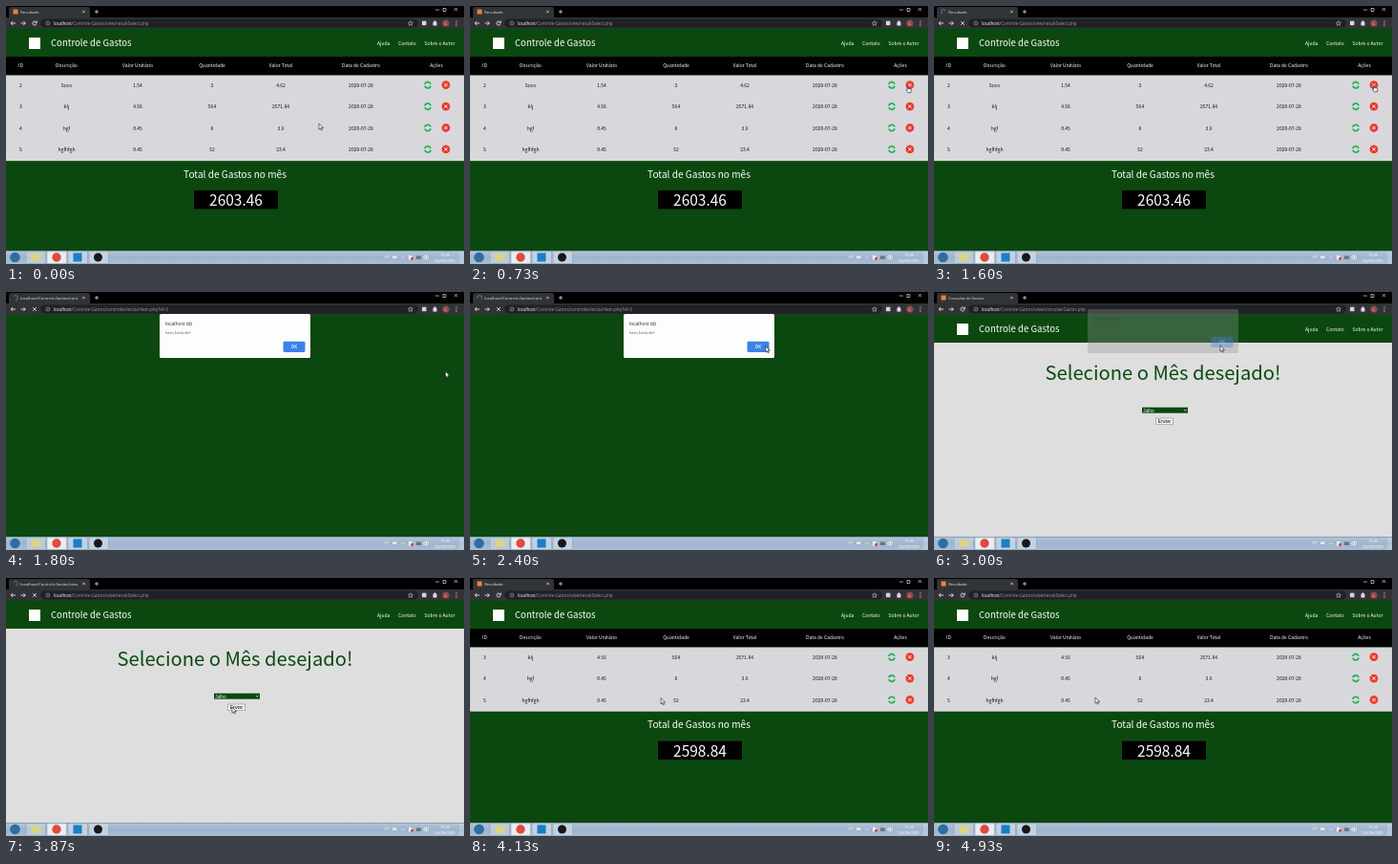
An HTML page with a canvas that plays this animation: 480x270 px, repeating every 4990 ms.

```html
<!DOCTYPE html>
<html lang="pt">
<head>
<meta charset="utf-8">
<style>
html, body { margin: 0; width: 100%; height: 100%; overflow: hidden; background: #000; }
canvas { display: block; width: 480px; height: 270px; }
</style>
</head>
<body>
<canvas id="stage" width="480" height="270"></canvas>
<script>
const g = document.getElementById('stage').getContext('2d');
const LOOP = 4990, STEPS = 75;
const SITE = '"Noto Sans CJK JP", "Noto Sans CJK SC", "Noto Sans CJK", sans-serif';
const UI = '"Open Sans", "Noto Sans", sans-serif';
const ARIAL = '"Liberation Sans", Arial, sans-serif';
const GREEN = '#0b480f', ORANGE = '#f08040';

const rect = (x, y, w, h, color) => { g.fillStyle = color; g.fillRect(x, y, w, h); };
const rounded = (x, y, w, h, r, color) => {
  g.fillStyle = color;
  g.beginPath(); g.roundRect(x, y, w, h, r); g.fill();
};
const circle = (x, y, r, color) => {
  g.fillStyle = color;
  g.beginPath(); g.arc(x, y, r, 0, 7); g.fill();
};
const arc = (x, y, r, from, to, color, width) => {
  g.strokeStyle = color; g.lineWidth = width;
  g.beginPath(); g.arc(x, y, r, from, to); g.stroke();
};
const line = (color, width, ...paths) => {
  g.strokeStyle = color; g.lineWidth = width;
  g.stroke(new Path2D(paths.join('')));
};
const text = (s, x, y, size, color, align = 'left', font = SITE, weight = 400) => {
  g.font = `${weight} ${size}px ${font}`;
  g.textAlign = align; g.fillStyle = color;
  g.fillText(s, x, y);
};
const cross = (x, y, r, color, width) =>
  line(color, width, `M${x - r} ${y - r}L${x + r} ${y + r}M${x + r} ${y - r}L${x - r} ${y + r}`);

const COLUMNS = [15.5, 63.5, 138, 216, 288, 372, 451];
const HEADINGS = ['ID', 'Descrição', 'Valor Unitário', 'Quantidade', 'Valor Total', 'Data de Cadastro', 'Ações'];
const ITEMS = [
  [2, 'Suco', '1.54', 3, '4.62'],
  [3, 'klj', '4.56', 564, '2571.84'],
  [4, 'hgf', '0.45', 8, '3.6'],
  [5, 'hgfhfgh', '0.45', 52, '23.4']
];

// Browser states by start time
const STATES = [
  { at: 0, title: 'Resultado', path: 'view/resultSelect.php', page: () => results(ITEMS, '2603.46') },
  { at: 1460, title: 'Resultado', path: 'view/resultSelect.php', loading: true, spin: true, page: () => results(ITEMS, '2603.46') },
  { at: 1660, title: 'localhost/Controle-Gastos/contr', path: 'controller/excluirItem.php?id=2', loading: true, spin: true, page: blank },
  { at: 2920, title: 'Consulta de Gastos', path: 'view/consultarGastos.php', loading: true, page: blank },
  { at: 2990, title: 'Consulta de Gastos', path: 'view/consultarGastos.php', page: monthForm },
  { at: 3790, title: 'localhost/Controle-Gastos/view/r', path: 'view/resultSelect.php', loading: true, spin: true, page: monthForm },
  { at: 3990, title: 'Resultado', path: 'view/resultSelect.php', page: () => results(ITEMS.slice(1), '2598.84') }
];

// Pointer: time, x, y
const POINTER = [
  [0, 328, 123], [130, 336, 122], [530, 449, 87], [730, 460.5, 83],
  [2000, 460.5, 83], [2470, 300, 55], [3070, 300, 56], [3530, 239, 134],
  [3600, 237, 135], [4000, 237, 135], [4270, 158, 115], [4530, 53, 85],
  [4800, 122, 107], [4870, 166, 124], [4990, 172.5, 126]
];

function pointerAt(t) {
  const i = POINTER.findIndex(p => p[0] > t);
  const [t0, x0, y0] = POINTER[i - 1], [t1, x1, y1] = POINTER[i];
  const k = (t - t0) / (t1 - t0), e = k * k * (3 - 2 * k);
  return [x0 + (x1 - x0) * e, y0 + (y1 - y0) * e];
}

function blank() { rect(0, 23, 480, 233, GREEN); }

function siteHeader() {
  rect(0, 23, 480, 30, GREEN);
  rect(24, 33, 12, 12, '#fff');
  text('Controle de Gastos', 47, 42, 9.6, '#fff');
  text('Ajuda', 389, 41, 5.03, '#fff', 'left', SITE, 500);
  text('Contato', 411, 41, 5.03, '#fff', 'left', SITE, 500);
  text('Sobre o Autor', 438.5, 41, 5.03, '#fff', 'left', SITE, 500);
}

function results(items, total) {
  blank();
  siteHeader();
  rect(0, 53, 480, 19.5, '#000');
  HEADINGS.forEach((s, i) => text(s, COLUMNS[i], 64, 5.03, '#fff', 'center', SITE, 500));
  const bottom = 72.5 + items.length * 22.4;
  rect(0, 72.5, 480, bottom - 72.5, '#d8d8dc');
  items.forEach((item, row) => {
    const y = 82.7 + row * 22.4;
    [...item, '2020-07-28'].forEach((s, i) => text(s, COLUMNS[i], y + 2, 5.03, '#111', 'center'));
    arc(442, y, 3.2, -2.9, -0.3, '#22b455', 1.8);
    arc(442, y, 3.2, 0.25, 2.85, '#22b455', 1.8);
    circle(461, y, 4.4, '#ec3b30');
    cross(461, y, 1.5, '#fff', 1);
  });
  text('Total de Gastos no mês', 240, bottom + 17.5, 10.1, '#fff', 'center');
  rect(197, bottom + 31, 88, 19.3, '#000');
  text(total, 241, bottom + 46.8, 15.5, '#fff', 'center');
}

function monthForm() {
  rect(0, 53, 480, 203, '#dedede');
  siteHeader();
  text('Selecione o Mês desejado!', 240, 91.5, 20.2, GREEN, 'center');
  rect(218, 120.7, 48, 6, GREEN);
  text('Julho', 219.3, 125.5, 4.7, '#fff', 'left', ARIAL);
  line('#fff', 0.8, 'M261.8 123l1.4 1.4l1.4-1.4');
  rounded(232, 131.7, 18.8, 7.2, 0.8, '#777');
  rounded(232.5, 132.2, 17.8, 6.2, 0.5, '#f2f2f2');
  text('Enviar', 241.4, 137, 4.7, '#000', 'center', ARIAL);
}

function dialog(t) {
  if (t < 1720 || t > 3040) return;
  const fading = t > 2990;
  const dy = fading ? -5 : t > 2920 ? -2 : 0;
  g.save();
  g.globalAlpha = fading ? 0.35 : t > 2920 ? 0.92 : t < 1780 ? 0.6 : 1;
  g.translate(0, dy);
  rounded(161, 23, 158, 46, 1.5, fading ? '#8f968f' : '#fdfdfd');
  text('localhost diz', 167, 34.7, 4.9, '#222', 'left', UI);
  text('Item Excluido!', 167, 44.3, 4.1, '#555', 'left', UI);
  rounded(290.5, 51.8, 23, 11.2, 1.4, '#3b82e8');
  text('OK', 302, 59, 4.4, '#fff', 'center', UI, 600);
  g.restore();
}

function browser(state, t) {
  rect(0, 0, 480, 12, '#000');
  rounded(3, 1, 85, 12, [2, 2, 0, 0], '#323337');
  rect(0, 12, 480, 11.5, '#323337');
  if (state.spin) arc(10, 6, 2.4, t / 110, t / 110 + 4, '#888', 0.8);
  else rect(7.5, 3.5, 5, 5, ORANGE);
  g.save();
  g.beginPath(); g.rect(15, 0, 60, 12); g.clip();
  text(state.title, 15.3, 7.8, 4.15, '#e8e8e8', 'left', UI);
  g.restore();
  cross(81.5, 6, 1.3, '#ddd', 0.7);
  line('#ddd', 0.8, 'M93 6h4M95 4v4');
  line('#ddd', 0.7, 'M450 4h4', 'M458 2.5h3v3h-3z', 'M470 2l3 3m0-3l-3 3');

  rounded(36, 13.5, 396, 9, 4.5, '#202124');
  line('#e4e4e4', 0.9, 'M10 18H5.2m2-2l-2 2l2 2', 'M15.5 18h4.8m-2-2l2 2l-2 2');
  if (state.loading) cross(30, 18, 1.8, '#e4e4e4', 0.9);
  else {
    arc(30, 18, 2, 0.3, 5.5, '#e4e4e4', 0.9);
    line('#e4e4e4', 0.9, 'M32.3 15.5v2h-2');
  }
  arc(44, 18, 2, 0, 7, '#aaa', 0.6);
  line('#aaa', 0.6, 'M44 17.6v1.5M44 16.6v.5');
  text('localhost', 50, 19.9, 4.45, '#fff', 'left', UI);
  const hostWidth = g.measureText('localhost').width;
  text('/Controle-Gastos/' + state.path, 50 + hostWidth, 19.9, 4.45, '#9a9da1', 'left', UI);
  line('#ccc', 0.6, 'M424 15.6l.7 1.7h1.8l-1.4 1.2l.5 1.9l-1.6-1.1l-1.6 1.1l.5-1.9l-1.4-1.2h1.8z');
  rect(436, 15.7, 4.5, 4.5, '#d5d5d5');
  rounded(447.5, 16.5, 4, 4, 0.5, '#ddd');
  circle(449.5, 16.3, 1, '#ddd');
  circle(461, 18, 3.6, '#984848');
  text('L', 461, 19.5, 4, '#fff', 'center', UI);
  [15.8, 18, 20.2].forEach(y => circle(472, y, 0.6, '#ddd'));
}

function taskbar() {
  const fill = g.createLinearGradient(0, 256, 0, 270);
  fill.addColorStop(0, '#b4c5d8');
  fill.addColorStop(0.5, '#9fb5cd');
  fill.addColorStop(1, '#a9bdd3');
  rect(0, 256, 480, 14, fill);
  rect(0, 256, 480, 0.6, '#71869b');
  [[21, 0.25], [43, 0.75], [65, 0.35], [87, 0.35]].forEach(([x, a]) => {
    rounded(x, 256.8, 20.5, 12.7, 1, `rgba(255,255,255,${a})`);
    line('#7d92a8', 0.4, `M${x} 257h20.5v12.5h-20.5z`);
  });
  circle(9.5, 263, 5.3, '#2c6f9f');
  rect(26.5, 259.3, 10, 7.5, '#d9d486');
  circle(53, 263, 4.7, '#e2483b');
  rect(70.5, 258.5, 9, 9, '#1580c8');
  circle(96.5, 263, 4.5, '#17171b');
  text('PT', 397, 264, 4.2, '#fff', 'left', UI);
  rect(405, 261.5, 4.5, 2.5, '#e3e8ee');
  line('#fff', 0.6, 'M414.5 264l1.5-1.5l1.5 1.5');
  rect(422, 261, 3.5, 4.5, '#eee');
  circle(425.5, 264.5, 1.4, '#d53a32');
  rect(430, 261.5, 5, 3.5, '#667688');
  line('#fff', 0.7, 'M438 262v2h1l1.5 1.3v-4.6l-1.5 1.3z', 'M442 261.5q1 1.5 0 3');
  text('16:45', 460, 261.9, 4, '#fff', 'center', UI);
  text('02/08/2020', 460, 268.1, 4, '#fff', 'center', UI);
  rect(475, 257, 5, 13, 'rgba(255,255,255,.2)');
}

const ARROW = new Path2D('M0 0v6.2l1.4-1.3l1 2.2l1.1-.5l-1-2.1h2z');
const HAND = new Path2D('M.2 0q.8-.5 1 .4v2.1l2.5.5q.9.3.7 1.3l-.5 2.5h-3l-1.7-2.5q0-.9 1 0z');

function pointer(t) {
  const [x, y] = pointerAt(t);
  const overLink = t >= 600 && t < 1650;
  const shape = overLink ? HAND : ARROW;
  g.save();
  g.translate(x, y);
  g.fillStyle = '#fff'; g.fill(shape);
  g.strokeStyle = '#111'; g.lineWidth = 0.6; g.stroke(shape);
  g.restore();
}

function draw(now) {
  const t = Math.floor((now % LOOP) / LOOP * STEPS) * LOOP / STEPS + 4;
  const state = STATES.findLast(s => t >= s.at);
  state.page();
  browser(state, t);
  dialog(t);
  taskbar();
  pointer(t);
  requestAnimationFrame(draw);
}
requestAnimationFrame(draw);
</script>
</body>
</html>
```
